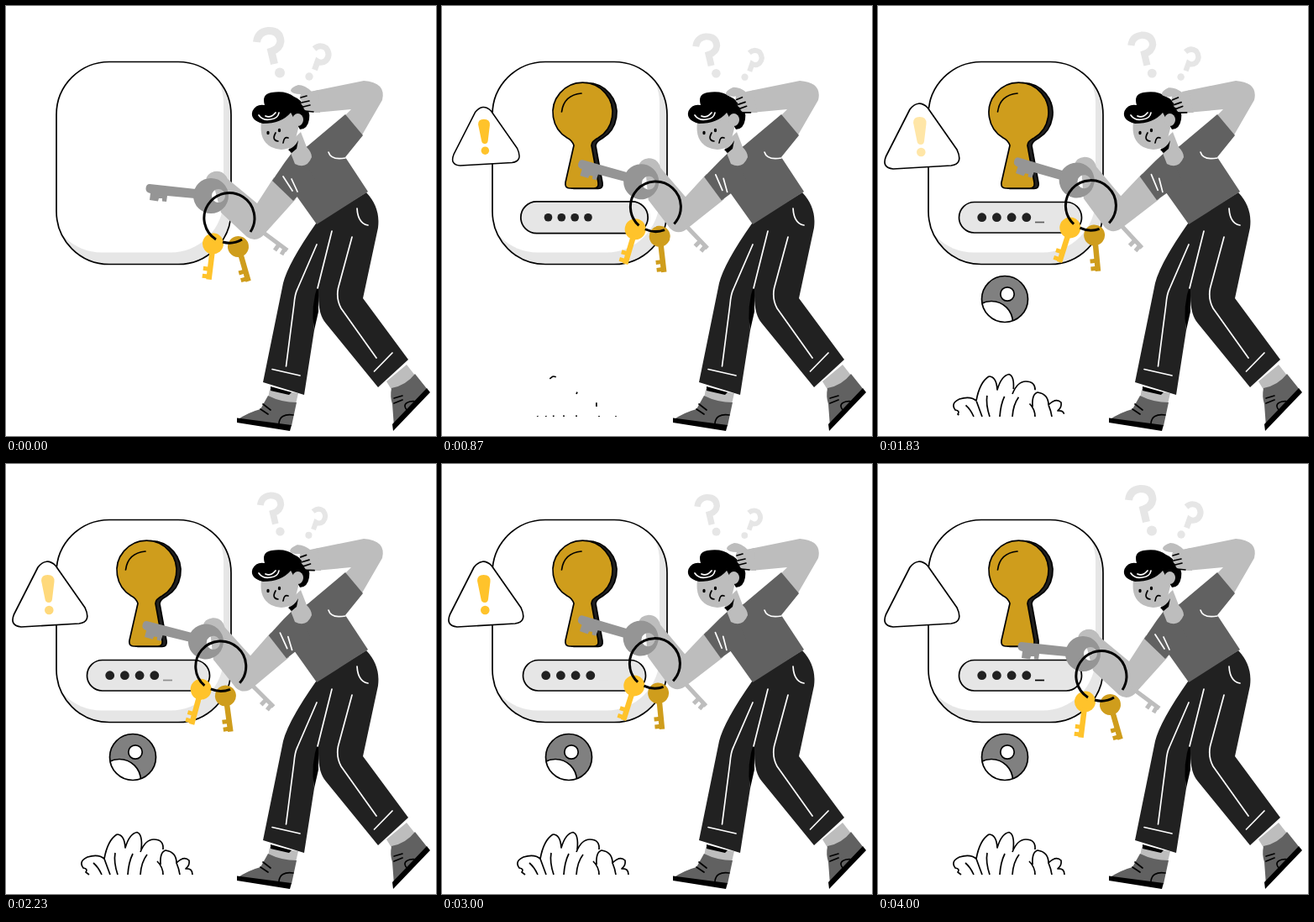
Write an HTML page that moves like this. It is 512x512 px and loops after 4.03 s.

```html
<!DOCTYPE html>
<html>
<head>
<meta charset="utf-8">
<style>
html, body { margin: 0; width: 100%; height: 100%; overflow: hidden; background: #fff; }
svg { display: block; width: 100vw; height: 100vh; }
.line { fill: none; stroke: #000; stroke-width: 1.7; stroke-linecap: round; stroke-linejoin: round; }
.edge { stroke: #000; stroke-width: 1.7; stroke-linejoin: round; }
.white { stroke: #fff; }
.skin { fill: #bdbdbd; }
.shirt { fill: #616161; }
.ask { fill: none; stroke: #e6e6e6; }
.askdot { fill: #e6e6e6; stroke: none; }
</style>
</head>
<body>
<svg viewBox="0 0 512 512">
  <defs>
    <rect id="panel" x="60" y="66.5" width="208" height="241" rx="63"/>
    <clipPath id="inPanel"><use href="#panel"/></clipPath>
    <clipPath id="inBadge"><circle cx="151" cy="349" r="27.5"/></clipPath>
    <path id="hole" d="M157 166 Q155 160 149 157 A35.5 35.5 0 1 1 186 157 Q178 161 178 166 L186 210 Q187 217 181 217 H152 Q146 217 147 210Z"/>
    <g id="smallKey">
      <circle r="12.5"/>
      <path d="M-3 8 H3.5 V43 H-3 V42 H-8 V37 H-3 V33 H-8 V28 H-3Z"/>
    </g>
  </defs>

  <!-- lock panel -->
  <use href="#panel" fill="#e6e6e6"/>
  <g clip-path="url(#inPanel)"><use href="#panel" x="-9" y="-14" fill="#fff"/></g>
  <use href="#panel" class="line"/>

  <g id="keyhole">
    <use href="#hole" x="5" y=".5" fill="#212121" class="edge"/>
    <use href="#hole" fill="#cf9d1c" class="edge"/>
    <path class="line" d="M142.500 126 Q145 106 166 104"/>
  </g>
  <rect id="field" x="96.500" y="233.500" width="146" height="36.500" rx="18.250" fill="#e6e6e6" class="edge"/>
  <g id="dots" fill="#212121">
    <circle cx="123.700" cy="251.700" r="5.400"/><circle cx="141.400" cy="251.700" r="5.400"/>
    <circle cx="159.100" cy="251.700" r="5.400"/><circle cx="176.800" cy="251.700" r="5.400"/>
  </g>
  <path id="cursor" class="line" style="stroke-linecap:butt" d="M187 257.500 H198"/>

  <g id="alert">
    <path class="edge" fill="#fff" d="M38 123 Q48 110.500 59 121 L94 171 Q102 188 87 190 L18 194 Q4 192.500 9.500 179Z"/>
    <g id="bang" fill="#ffc32b">
      <path d="M42 139 Q42 132 49.500 132 Q58 132 57.500 140 L55 161 Q54.500 165 51 165 Q47 165 46.500 161Z"/>
      <circle cx="51.300" cy="174" r="5.300"/>
    </g>
  </g>

  <g id="badge">
    <circle cx="151" cy="349" r="27.500" fill="#808080"/>
    <circle cx="135" cy="377" r="25.500" fill="#fff" class="edge" clip-path="url(#inBadge)"/>
    <circle cx="154" cy="343" r="8.200" fill="#fff" class="edge"/>
    <circle cx="151" cy="349" r="27.500" class="line"/>
  </g>

  <g id="bush" class="line">
    <path d="M132 441 Q121 448 117 470 Q110 464 97 468 Q86 473 92 481 Q98 482 95 486 L99 489"/>
    <path d="M132 441 Q141 441 142 457 Q147 440 156 438.500 Q163 441 161 459"/>
    <path d="M160 462 Q166 447 176 447 Q188 447 187 459"/>
    <path d="M184 477 Q183 462 190 460 Q203 462 203 475 Q212 466 218 472 Q219 478 214 482 Q222 481 222 489"/>
    <path d="M124 489 Q121 481 117 470"/>
    <path d="M133 489 Q128 474 130 463"/>
    <path d="M145 489 Q146 474 151 464"/>
    <path d="M160 489 Q161 474 168 465"/>
    <path d="M114 489 Q110 480 104 475"/>
    <path d="M187 489 Q187 480 180 473"/>
    <path d="M207 489 Q206 482 203 475"/>
  </g>

  <!-- questions -->
  <g id="ask1" class="ask" stroke-width="9">
    <path d="M298.500 43 Q300 31 312 29.500 Q326 29 327 42 Q326 51 316 54 L319.500 69"/>
    <circle class="askdot" cx="326" cy="79.500" r="6"/>
  </g>
  <g id="ask2" class="ask" stroke-width="7">
    <path d="M367 51 Q374 45 381 50 Q387 58 381 65 Q376 69 371 66 L367.500 76"/>
    <circle class="askdot" cx="361" cy="84" r="4.700"/>
  </g>

  <!-- legs -->
  <path class="skin" d="M314 456 L348 461 L345 474 L312 467Z M453 447 L477 427 L488 441 L461 460Z"/>
  <path d="M315 453 L340 460 L337 463 L315 458Z"/>
  <path class="shirt" d="M312 464 Q328 472 346 472 L340 500 L275 493 Q288 484 303 480Z M487 438 L503 458 L462 501 L460 474 Q457 465 459 455 Q476 452 487 438Z"/>
  <path d="M275 490.500 L340 499 L338 506 L275 496Z M501 455 L505 460 L461 506 L460 498Z"/>
  <path class="line" d="M325 497 Q326 485 342 487 M303 480 L312 486 M306 474 L315 481 M479 483 Q470 474 481 471 Q487 470 490 472 M462 467 L472 464 M462 473 L472 469"/>
  <path fill="#212121" d="M369 259 L429 222 Q446 240 443 264 L425 348 L479 421 L443 454 L381 378 Q372 368 372 345 Q364 360 367 386 L355 463 L306 448 L330 330 Q336 306 369 259Z"/>
  <path d="M372 330 Q362 358 367 386 L372 364Z"/>
  <path class="line white" d="M370 284 L347 337 Q344 343 343 355 L333.500 429 M388 268 L371 336 M412 275 L395.500 336 Q393 349 399 360 L441 419 M317 432.500 L350 440 M438.500 435 L460 413 M418 241 Q419 259 431 261"/>

  <!-- arm with keys -->
  <g id="arm">
    <path class="skin" d="M319 204 L299 235 L264 206 Q259 195 248 197 Q238 200 238 208 L248 216 L256 246 L287 275 Q299 283 309 270 L345 230Z"/>
    <path fill="none" stroke="#bdbdbd" stroke-width="5" d="M300 265 L335 291 M325 284 L320 291 M332 289 L328 296"/>
    <g fill="#959595">
      <path fill-rule="evenodd" d="M223 226 a21 21 0 1 0 42 0 a21 21 0 1 0 -42 0Z M245 226 a8 8 0 1 0 16 0 a8 8 0 1 0 -16 0Z"/>
      <path d="M171 212 L226 218 L225 229 L192 226 L191 233 L186 232.500 L186 229 L182 229 L181 232.500 L171 231 L172 223 Q166 222 166.500 217 Q167 212 171 212Z"/>
    </g>
    <use href="#smallKey" fill="#ffc32b" transform="translate(246.500 283) rotate(7)"/>
    <use href="#smallKey" fill="#cf9d1c" transform="translate(276.500 286.500) rotate(-16)"/>
    <path fill="none" stroke="#000" stroke-width="3" d="M291 269 A30 30 0 1 0 250 278 M258 281 A30 30 0 0 0 281 278"/>
  </g>

  <!-- raised arm and body -->
  <path class="skin" d="M402 132 L411 123 L368 127 L362 102 L426 89 Q453 91 448 112 L422 157Z"/>
  <path class="shirt" d="M331 189 Q341 180 360 166 L404 129 L425 154 L404 180 L431 221 L370 260 L338 215Z"/>
  <path class="line white" d="M384 174 Q387 184 404 181"/>
  <g id="sleeve">
    <path class="shirt" d="M344 170 L332 186 L317 208 L342 232 L368 205Z"/>
    <path class="line white" d="M330 203 L341 220 M340 206 L347 221"/>
  </g>

  <!-- head -->
  <path class="skin" d="M335 165 L344 188 Q358 195 364 180 Q364 174 358 168 L351 150Z"/>
  <path d="M336 171 Q344 168 348 160 L346 170 L340 175Z"/>
  <path class="skin" d="M304 138 Q301 160 316 168 Q331 175 343 165 L349 142 L338 126Z"/>
  <path d="M306 140 Q290 136 293.500 125 Q298 116 308 118 Q304 105 316 103 Q333 100 343 108 Q353 112 354 120 Q363 124 361 135 Q359 147 350 147 L339 127 Q328 140 306 140Z"/>
  <ellipse class="skin" cx="347.500" cy="135.500" rx="6.500" ry="7.500"/>
  <path class="line white" d="M301 130 Q306 137 315 135 Q324 134 325 127 M309 131 Q315 134 321 127"/>
  <g id="eyes"><ellipse cx="312" cy="151" rx="1.700" ry="2.200"/><ellipse cx="325.500" cy="148" rx="1.700" ry="2.200"/></g>
  <path class="line" d="M321 151 Q316 160 324 161 M330 163 Q331 155 336 157"/>

  <g id="hand">
    <path class="skin" d="M372 100 L364 102 Q356 94 348 94 Q339 97 339 101 Q341 105 351 105 Q348 110 352 113 Q350 117 354 119 Q354 125 361 126 L374 127Z"/>
    <path class="line" d="M351 109 L358 107 M352 115 L361 113 M354 120 L362 118 M356 125 L366 126"/>
  </g>
</svg>
<script>
const LOOP = 4030, CYCLE = 4000 / 3;
const $ = id => document.getElementById(id);
const clamp = x => Math.max(0, Math.min(1, x));
const ease = x => (1 - Math.cos(Math.PI * clamp(x))) / 2;
const zigzag = (t, period) => 1 - Math.abs(1 - 2 * (t / period % 1));
const wave = (t, period) => ease(zigzag(t, period));

// grows past full size, then settles
function pop(age) {
  return age < 400 ? 1.17 * ease(age / 400) : 1.17 - 0.17 * ease((age - 400) / 333);
}
function scale(id, s, x, y) {
  $(id).setAttribute('transform', `translate(${x} ${y}) scale(${s}) translate(${-x} ${-y})`);
}
function rotate(id, deg, x, y) {
  $(id).setAttribute('transform', `rotate(${deg} ${x} ${y})`);
}

const pops = [
  ['keyhole', 0, 169, 154], ['field', 240, 169.5, 252], ['dots', 600, 150, 252],
  ['alert', 600, 52, 157], ['badge', 890, 151, 349]
];
const twigs = [...$('bush').children];
twigs.forEach(p => {
  p.setAttribute('pathLength', 1);
  p.style.strokeLinecap = 'butt';
});

function draw(t) {
  const now = Math.min(t, 4000), c = now % CYCLE;
  for (const [id, start, x, y] of pops) scale(id, pop(t - start), x, y);

  const glow = t < 1000 ? 1 : zigzag(now, CYCLE / 2) ** 1.3;
  $('bang').setAttribute('opacity', glow);
  $('cursor').setAttribute('opacity', 1 - glow);

  const grown = ease((t - 667) / 1333);
  for (const p of twigs) {
    p.style.strokeDasharray = grown < 1 ? `${grown} 2` : 'none';
    p.style.visibility = grown > 0 ? 'visible' : 'hidden';
  }

  const beat = wave(now, CYCLE / 2);
  scale('ask1', 1 - 0.18 * beat, 329, 86);
  scale('ask2', 1 - 0.18 * beat, 357, 90);

  const reach = 10.5 * (ease((c - 80) / 240) - ease((c - 825) / 240));
  rotate('arm', reach, 341, 177);
  rotate('sleeve', reach, 341, 177);
  rotate('hand', -7 * wave(now, CYCLE / 4), 374, 113);
  $('eyes').style.visibility = c > 80 && c < 200 ? 'hidden' : 'visible';
}

function tick() {
  draw(performance.now() % LOOP);
  requestAnimationFrame(tick);
}
tick();
</script>
</body>
</html>
```
